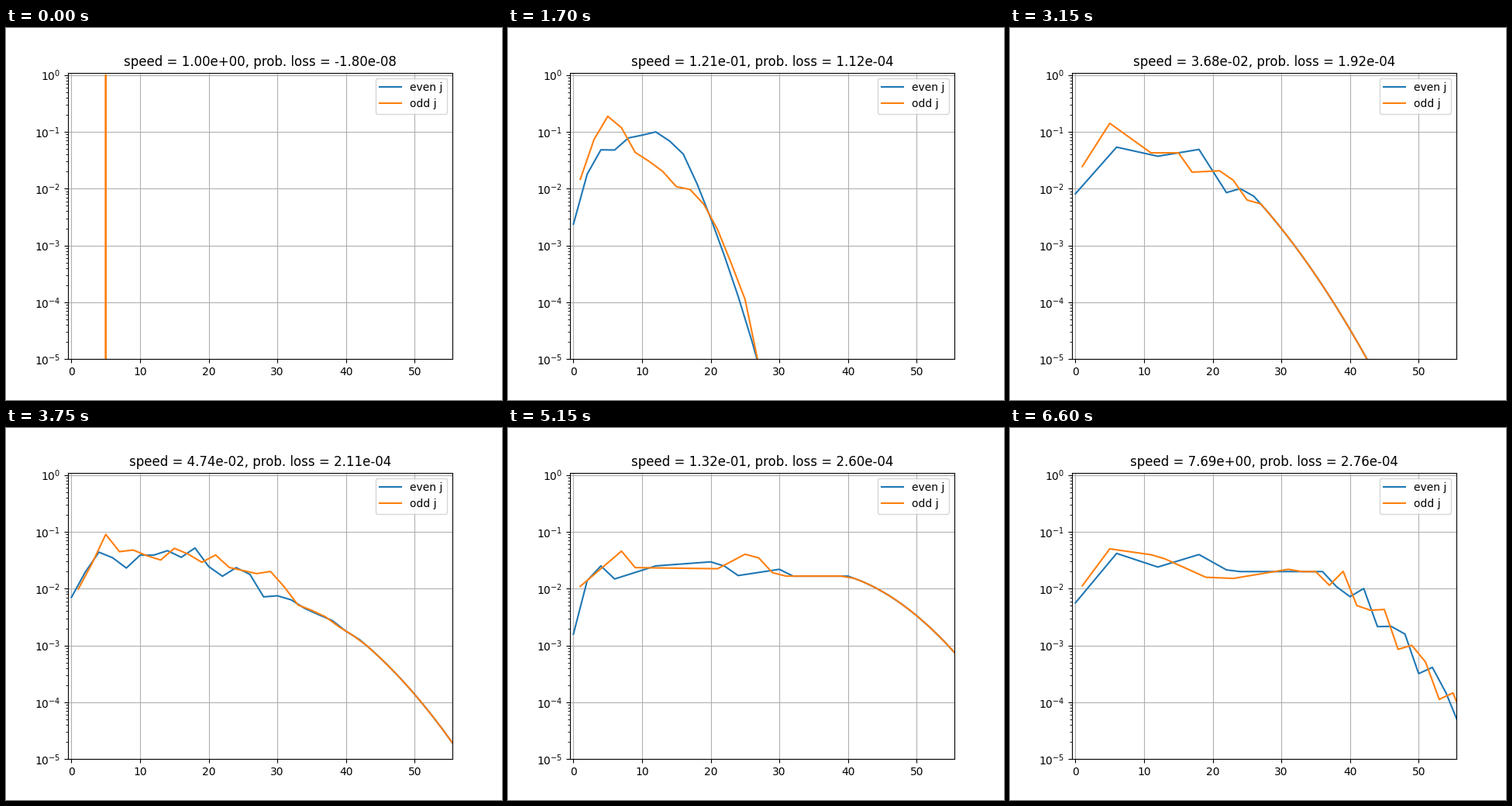
Recreate the animation shown at these times as a matplotlib script. Size 640 by 480 pixels, loop 6.65 s.

```python
import numpy as np
import matplotlib.pyplot as plt
from matplotlib.animation import FuncAnimation

FRAMES, INTERVAL = 133, 50
J = np.arange(58)
START = 5  # the only level occupied at first

rng = np.random.default_rng(7)
phase = rng.uniform(0, 2 * np.pi, J.size)
rate = rng.uniform(0.2, 0.5, J.size)
jitter = rng.normal(0, 0.12, FRAMES)

poses = []


def front(j0, level, slope, curve, beat=0):
    """Log population: flat up to j0, then a parabola with an interference beat."""
    x = np.maximum(J - j0, 0)
    fringe = (-1.0) ** J * np.cos(2 * np.pi * (J - 50) / 5.5)
    return -(level + slope * x + curve * x ** 2 + beat * fringe * (x > 0))


def pose(frame, speed, loss, tail, even, odd, ease=1):
    """Store a state: a few (j, decades below one) points, then the shared tail."""
    logp = tail.copy()
    for parity, points in enumerate((even, odd)):
        j, depth = zip(*points)
        body = (J % 2 == parity) & (J <= j[-1])
        logp[body] = -np.interp(J[body], j, depth)
    poses.append((frame, np.log10(speed), loss, logp, ease))


pose(22, 1.60e-1, 7.80e-5, front(16, 1.83, .356, .0105),
     [(0, 1.7), (2, 1.14), (4, .95), (11, .82), (14, 1.27)],
     [(1, 2.16), (5, 1.02), (9, 1.72), (13, 2.22), (15, 2.22), (20, 3.2), (25, 5.22)])
pose(46, 9.07e-2, 1.47e-4, front(16, 1.34, .0925, .0083),
     [(0, 3.76), (2, 2.35), (4, 1.88), (8, 1.46), (14, 1.23)],
     [(1, 1.61), (3, 1.05), (5, .83), (11, 1.0), (15, 1.72), (17, 1.72)])
pose(63, 3.68e-2, 1.92e-4, front(26, 2.135, .131, .0026),
     [(0, 2.09), (6, 1.27), (12, 1.43), (18, 1.31), (22, 2.07), (24, 2.0)],
     [(1, 1.61), (5, .85), (11, 1.37), (15, 1.37), (17, 1.71), (22, 1.68), (25, 2.2)])
pose(86, 1.24e-1, 2.28e-4, front(42, 1.82, .027, .0026),
     [(0, 2.36), (4, 1.54), (8, 1.89), (14, 1.5), (26, 1.7), (28, 2.19), (32, 1.84)],
     [(1, 2.5), (5, 1.16), (7, 1.81), (19, 1.49), (30, 1.48), (33, 1.82)], ease=.75)
pose(103, 1.32e-1, 2.60e-4, front(40, 1.78, .0385, .0031),
     [(0, 2.8), (2, 1.86), (4, 1.6), (6, 1.83), (12, 1.6), (21, 1.52), (24, 1.77), (30, 1.66)],
     [(1, 1.96), (7, 1.34), (9, 1.63), (21, 1.65), (26, 1.33), (29, 1.72)], ease=1.4)
pose(132, 7.69, 2.76e-4, front(36, 1.7, .074, .0026, beat=.25),
     [(0, 2.25), (6, 1.38), (12, 1.62), (18, 1.4), (22, 1.67)],
     [(1, 1.95), (5, 1.3), (12, 1.42), (19, 1.8), (23, 1.82), (31, 1.66)], ease=.8)


def state(i):
    """Speed, probability loss and level populations at frame i."""
    if i == 0:
        return 1.0, -1.80e-8, (J == START).astype(float)
    k = next(n for n, p in enumerate(poses) if i <= p[0])
    t1, speed1, loss1, log1, ease = poses[k]
    if k == 0:
        t0, speed0, loss0, total0 = 0, 0.0, 0.0, 1.0
    else:
        t0, speed0, loss0, log0, _ = poses[k - 1]
        total0 = (10 ** log0).sum()
    u = (i - t0) / (t1 - t0)
    if k == 0:
        logp = log1 + abs(J - START) * np.log10(u)  # spreading from one level
    else:
        logp = log0 + (log1 - log0) * u ** ease

    # populated levels shimmer, the tail stays smooth
    swing = np.sin(np.pi * u)
    logp = logp + 0.12 * swing * np.clip((3 + logp) / 1.5, 0, 1) * np.sin(phase + rate * i)
    p = 10 ** logp
    p *= (total0 + ((10 ** log1).sum() - total0) * u) / p.sum()

    speed = 10 ** (speed0 + (speed1 - speed0) * u + jitter[i] * swing)
    return speed, loss0 + (loss1 - loss0) * u, p


fig, ax = plt.subplots(figsize=(6.4, 4.8), dpi=100)
even_line, = ax.semilogy(J[0::2], np.ones(29), label="even j")
odd_line, = ax.semilogy(J[1::2], np.ones(29), label="odd j")
ax.set_xlim(-0.5, 55.5)
ax.set_ylim(1e-5, 1.1)
ax.grid(True)
ax.legend(loc="upper right")
title = ax.set_title("")


def update(i):
    speed, loss, p = state(i)
    even_line.set_ydata(p[0::2])
    odd_line.set_ydata(p[1::2])
    title.set_text(f"speed = {speed:.2e}, prob. loss = {loss:.2e}")
    return even_line, odd_line, title


anim = FuncAnimation(fig, update, frames=FRAMES, interval=INTERVAL, repeat=True)
plt.show()
```
